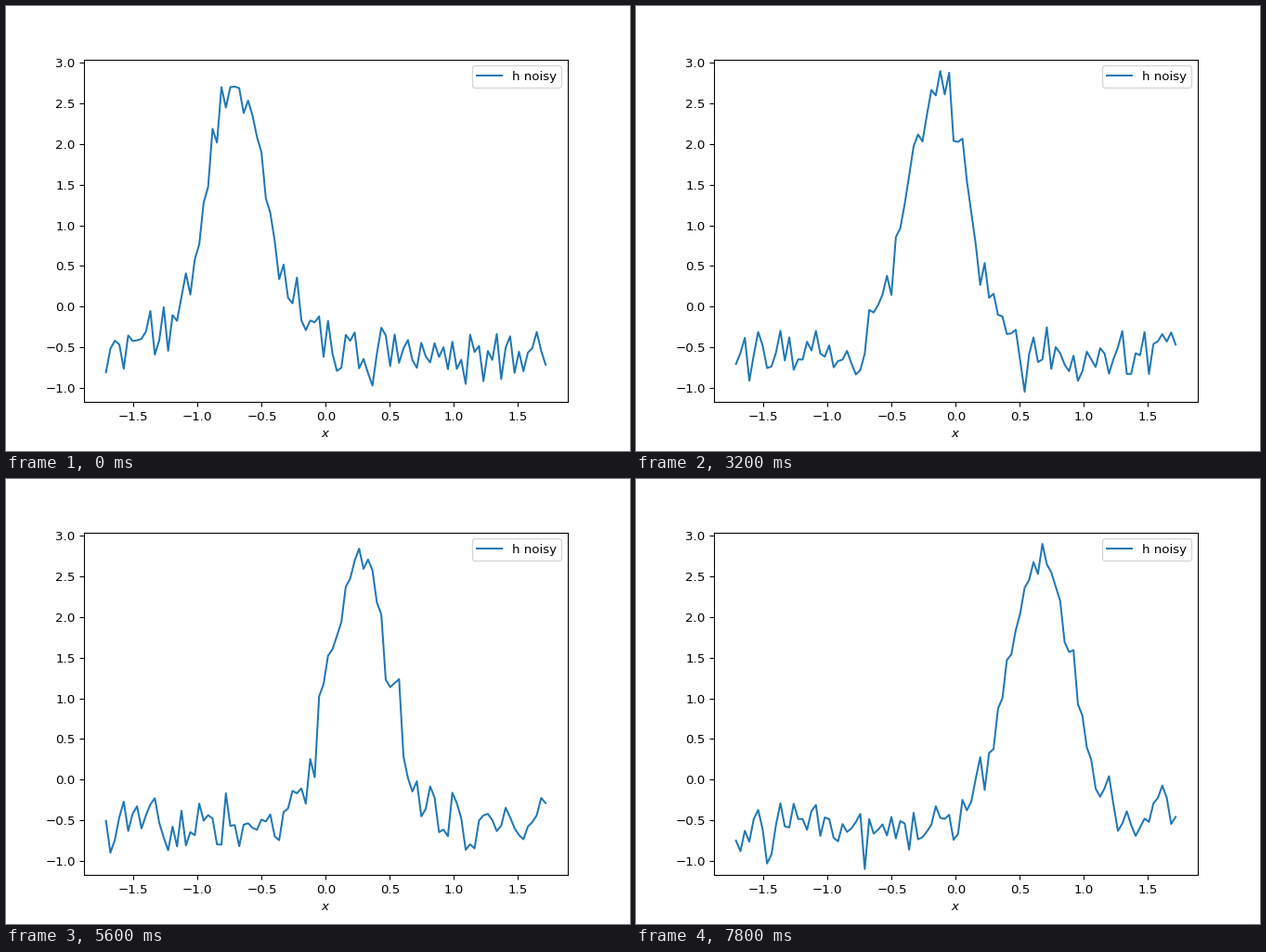
Animation of 672 by 480 pixels, one loop 8000 ms. Source, as a matplotlib script:

```python
import numpy as np
import matplotlib.pyplot as plt
from matplotlib.animation import FuncAnimation

POINTS = 100
FRAMES = 40
INTERVAL = 200
START = 29.3   # index of the bump's centre in the first frame
WIDTH = 7.0    # bump width, in samples
NOISE = 0.2


def standardize(values):
    return (values - values.mean()) / values.std()


index = np.arange(POINTS)
x = standardize(index.astype(float))


def bump(i):
    """Standardized Gaussian that moves one sample per frame."""
    return standardize(np.exp(-0.5 * ((index - START - i) / WIDTH) ** 2))


def noisy(i):
    rng = np.random.default_rng(100 + i)
    return bump(i) + NOISE * rng.standard_normal(POINTS)


fig, ax = plt.subplots(figsize=(7, 5), dpi=96)
line, = ax.plot(x, noisy(0), color="#1f77b4", lw=1.5, label="h noisy")
ax.set_xlim(1.1 * x[0], 1.1 * x[-1])
ax.set_ylim(-1.1714, 3.0386)
ax.set_xlabel("$x$")
ax.legend(loc="upper right")


def update(i):
    line.set_ydata(noisy(i))
    return line,


anim = FuncAnimation(fig, update, frames=FRAMES, interval=INTERVAL,
                     repeat=True, repeat_delay=0)
plt.show()
```
